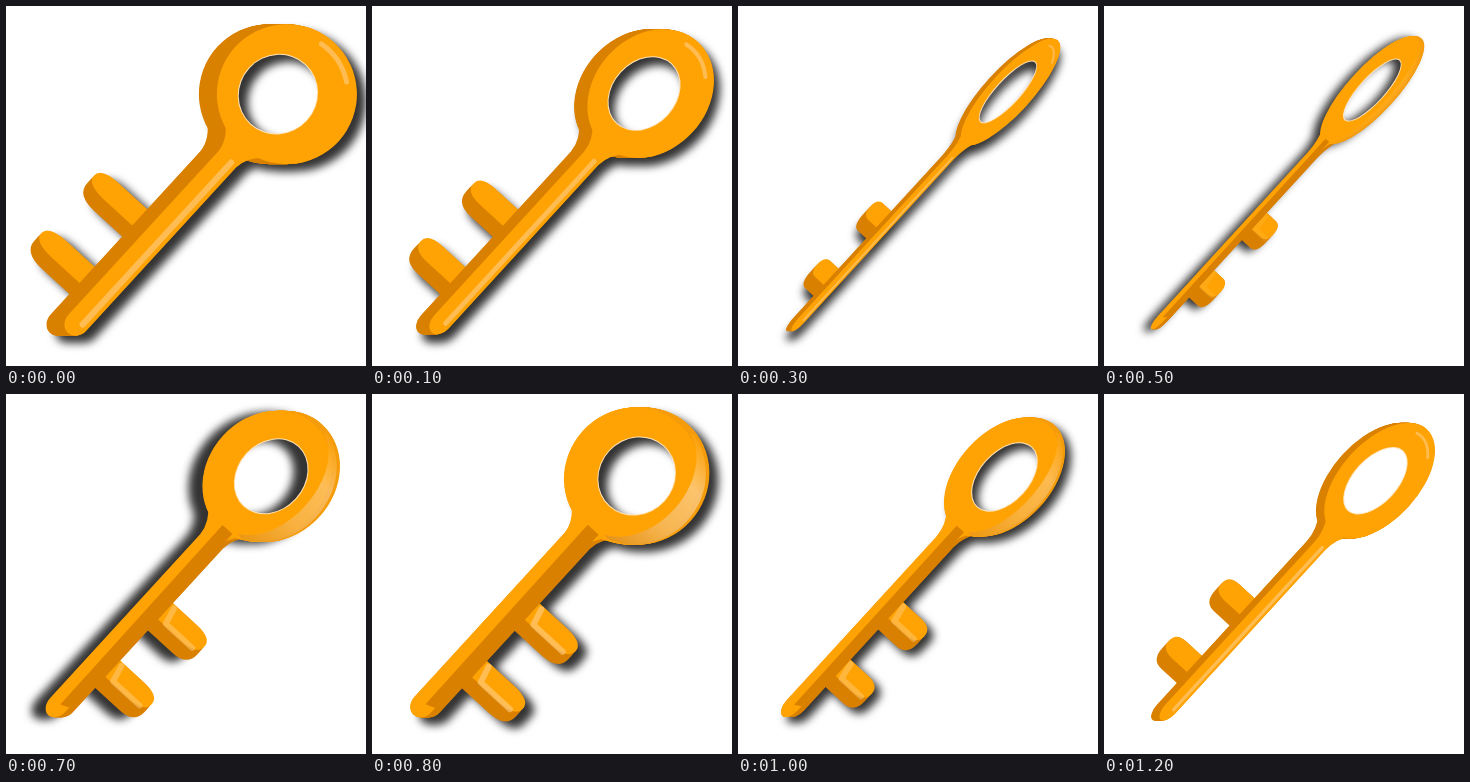
Write an HTML page with a canvas that moves like this. It is 360 by 360 pixels and loops after 1300 ms.

```html
<!DOCTYPE html>
<html lang="en">
<head>
<meta charset="utf-8">
<title>Turning key</title>
<style>
  html, body { margin: 0; width: 100%; height: 100%; overflow: hidden; background: #fff; }
  canvas { display: block; width: 100vw; height: 100vh; }
</style>
</head>
<body>
<canvas id="stage" width="360" height="360"></canvas>
<script>
const SIZE = 360, LOOP = 1300, TILT = 47.5 * Math.PI / 180;
const LIGHT = '#ffa304', MID = '#f59c0c', DARK = '#d98000', GLOSS = '#ffd292';
const RING = 70;

// start time, signed half width of the ring, shadow x, shadow y, shine
const poses = [
  [0, 70, 9, 7, .55],
  [100, 57, 6, 8, .55],
  [200, 39, 3, 8, .55],
  [300, 21, 0, 9, .5],
  [500, -22, -7, 2, .15],
  [600, -43, -10, 2, .4],
  [700, -60, -14, 2, .55],
  [800, -67, 9, 7, .7],
  [900, -60, 10, 8, .9],
  [1000, -44, 6, 6, .5],
  [1100, -20, 2, 3, .2],
  [1200, 39, 0, 0, .55]
];

const out = document.getElementById('stage').getContext('2d');
const layer = document.createElement('canvas');
layer.width = layer.height = SIZE;
const g = layer.getContext('2d');
const rad = deg => deg * Math.PI / 180;

// local x runs from the tip to the ring, local y across the key
function place(x, y) {
  g.setTransform(1, 0, 0, 1, x, y);
  g.rotate(-TILT);
}

function oval(rx, ry, color) {
  g.beginPath();
  g.ellipse(0, 0, rx, ry, 0, 0, 2 * Math.PI);
  g.fillStyle = color;
  g.fill();
}

function shaft(half, color) {
  const h = 12 * half / RING;
  g.beginPath();
  g.moveTo(-60, -half * .42);
  g.quadraticCurveTo(-72, -h * 1.1, -88, -h);
  g.lineTo(-310, -h);
  g.ellipse(-310, 0, 14, h, 0, -Math.PI / 2, Math.PI / 2, true);
  g.lineTo(-88, h);
  g.quadraticCurveTo(-72, h * 1.1, -60, half * .42);
  g.fillStyle = color;
  g.fill();
}

function bevel(half) {
  const h = 12 * half / RING;
  g.beginPath();
  g.moveTo(-66, 0);
  g.lineTo(-308, h * .15);
  g.lineTo(-304, h);
  g.lineTo(-66, h * 1.3);
  g.fillStyle = DARK;
  g.fill();
}

function toothPart(x, w, len, side, color) {
  const r = Math.min(w / 2, 16), bend = len * .28;
  g.beginPath();
  g.moveTo(x, 0);
  g.lineTo(x, side * (len - bend));
  g.quadraticCurveTo(x, side * len, x + r, side * len);
  g.lineTo(x + w - r, side * len);
  g.quadraticCurveTo(x + w, side * len, x + w, side * (len - bend));
  g.lineTo(x + w, 0);
  g.fillStyle = color;
  g.fill();
}

function streak(width, alpha, trace) {
  g.globalAlpha = alpha;
  g.strokeStyle = GLOSS;
  g.lineWidth = width;
  g.lineCap = g.lineJoin = 'round';
  g.beginPath();
  trace();
  g.stroke();
  g.globalAlpha = 1;
}

function tooth(x, len, side, shine) {
  toothPart(x, 37, len, side, DARK);
  toothPart(x + 15, 22, len, side, LIGHT);
  if (side > 0) streak(6, shine * .8, () => {
    g.moveTo(x + 34, len * .3);
    g.lineTo(x + 17, len * .36);
    g.lineTo(x + 17, len * .88);
  });
}

function crescent(half, shine) {
  const fade = g.createLinearGradient(-RING, 0, RING, 0);
  fade.addColorStop(0, '#d98a1c');
  fade.addColorStop(.35, '#f3bd70');
  fade.addColorStop(.7, '#fbd29a');
  fade.addColorStop(1, LIGHT);
  g.globalAlpha = shine;
  g.beginPath();
  g.ellipse(0, 0, RING, half, 0, rad(12), rad(162));
  g.ellipse(0, 0, RING * .98, half * .74, 0, rad(162), rad(12), true);
  g.fillStyle = fade;
  g.fill();
  g.globalAlpha = 1;
}

function drawKey(b, shine) {
  const half = Math.abs(b), front = b > 0, s = half / RING;
  const cx = 269 + b * (front ? .17 : .13), cy = 85 + b * .045;
  const depth = front ? -4 - b * b / 350 : 2 + half * .1;

  g.setTransform(1, 0, 0, 1, 0, 0);
  g.clearRect(0, 0, SIZE, SIZE);

  place(cx, cy);
  const len = half * 1.04 + Math.abs(depth) * .8;
  for (const x of [-201, -279]) tooth(x + depth * .85, len, front ? -1 : 1, shine);

  const steps = Math.ceil(Math.abs(depth)) * 2;
  for (let i = steps; i >= 0; i--) {
    place(cx + depth * i / steps, cy);
    shaft(half, i ? DARK : LIGHT);
    oval(RING, half, !i ? LIGHT : front ? DARK : MID);
  }

  if (front) {
    streak(Math.max(2, 6 * s), shine, () => {
      g.moveTo(-308, 5 * s);
      g.lineTo(-88, 5 * s);
    });
    streak(Math.max(2, 5 * s), shine, () =>
      g.ellipse(0, 0, RING * .87, half * .87, 0, rad(-8), rad(36)));
  } else {
    bevel(half);
    place(cx + depth * .6, cy);
    crescent(half, shine);
  }

  place(cx + depth / 2, cy);
  oval(41, half * .55 + 1, '#ffe3b8');
  g.globalCompositeOperation = 'destination-out';
  oval(40, half * .55, '#000');
  g.globalCompositeOperation = 'source-over';
}

function draw([, b, sx, sy, shine]) {
  drawKey(b, shine);
  out.fillStyle = '#fff';
  out.fillRect(0, 0, SIZE, SIZE);
  out.save();
  if (sx || sy) {
    out.shadowColor = 'rgba(0,0,0,.8)';
    out.shadowBlur = 9;
    out.shadowOffsetX = sx;
    out.shadowOffsetY = sy;
  }
  out.drawImage(layer, 0, 0);
  out.restore();
}

let start, shown;
function tick(now) {
  start ??= now;
  const t = (now - start) % LOOP;
  const pose = poses.findLast(p => p[0] <= t) || poses[0];
  if (pose !== shown) draw(shown = pose);
  requestAnimationFrame(tick);
}
draw(shown = poses[0]);
requestAnimationFrame(tick);
</script>
</body>
</html>
```
